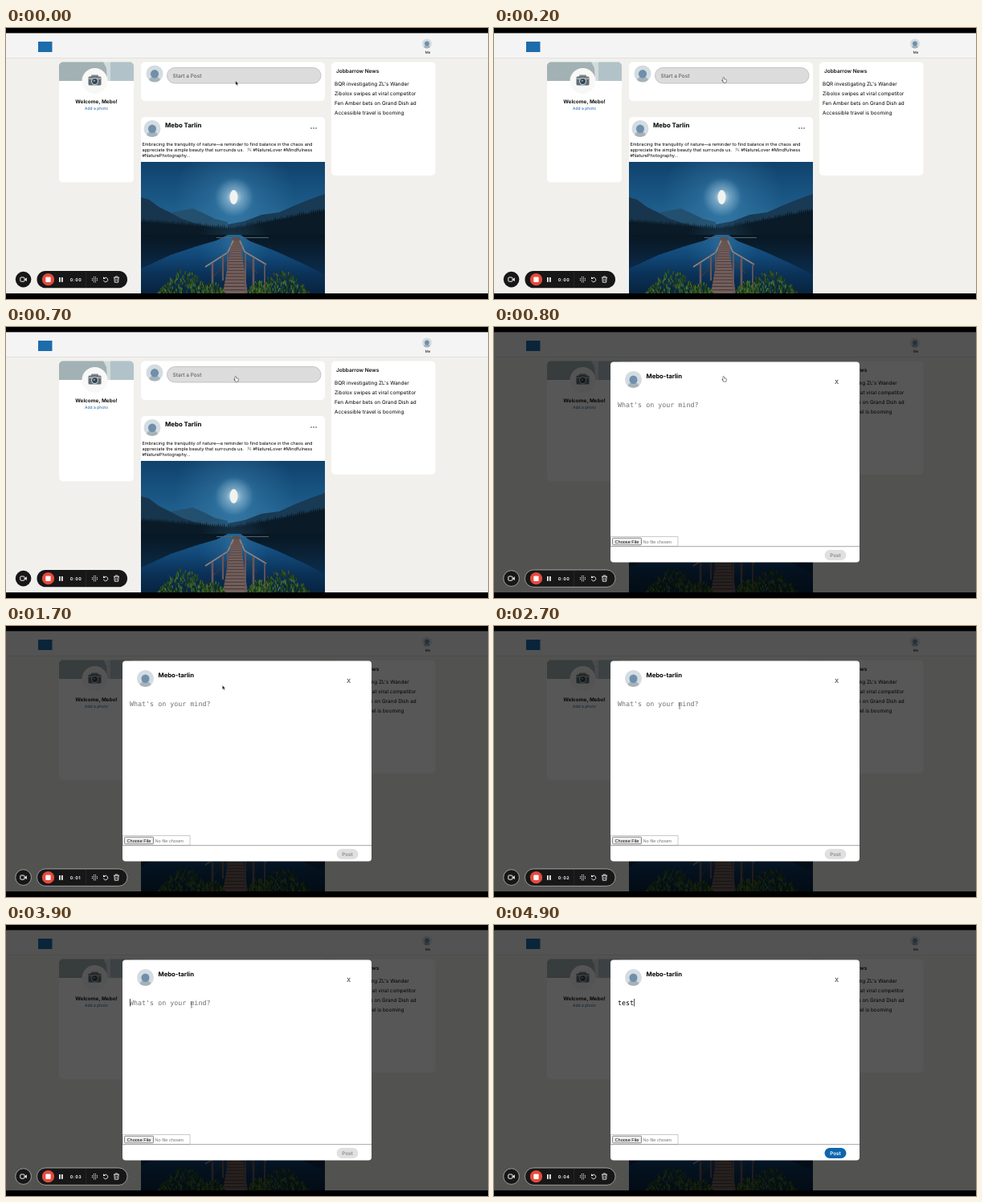
Write an HTML page with a canvas that moves like this. It is 600 px wide and 338 px high and loops after 5 s.

```html
<!DOCTYPE html>
<html lang="en">
<head>
<meta charset="utf-8">
<title>Start a post</title>
<style>
html, body { margin: 0; width: 100%; height: 100%; overflow: hidden; background: #000; }
canvas { display: block; width: 600px; height: 338px; }
</style>
</head>
<body>
<canvas id="stage"></canvas>
<script>
const W = 600, H = 338, LOOP = 5000;
const OPEN = 800, TYPE_START = 4100, KEY_GAP = 130;
const SANS = 'Inter, "Open Sans", sans-serif';
const ARIAL = '"Liberation Sans", Arial, sans-serif';
const MONO = '"DejaVu Sans Mono", monospace';
const USER = 'Mebo Tarlin';

const canvas = document.getElementById('stage');
const dpr = window.devicePixelRatio || 1;
canvas.width = W * dpr;
canvas.height = H * dpr;
const screen2d = canvas.getContext('2d');
let c = screen2d;

function rect(x, y, w, h, fill) {
  c.fillStyle = fill;
  c.fillRect(x, y, w, h);
}

function box(x, y, w, h, r, fill, stroke, lw = 1) {
  c.beginPath();
  c.roundRect(x, y, w, h, r);
  if (fill) { c.fillStyle = fill; c.fill(); }
  if (stroke) { c.strokeStyle = stroke; c.lineWidth = lw; c.stroke(); }
}

function oval(x, y, rx, fill, ry = rx) {
  c.beginPath();
  c.ellipse(x, y, rx, ry, 0, 0, Math.PI * 2);
  c.fillStyle = fill;
  c.fill();
}

function trace(points) {
  c.beginPath();
  points.forEach(([x, y], i) => i ? c.lineTo(x, y) : c.moveTo(x, y));
}

function poly(points, fill) {
  trace(points);
  c.closePath();
  c.fillStyle = fill;
  c.fill();
}

function line(points, color, width) {
  trace(points);
  c.strokeStyle = color;
  c.lineWidth = width;
  c.stroke();
}

function text(str, x, y, size, color = '#000', weight = 400, family = SANS, align = 'left') {
  c.font = `${weight} ${size}px ${family}`;
  c.textRendering = 'geometricPrecision';
  c.textAlign = align;
  c.fillStyle = color;
  c.fillText(str, x, y);
}

function gradient(y0, y1, ...colors) {
  const g = c.createLinearGradient(0, y0, 0, y1);
  colors.forEach((color, i) => g.addColorStop(i / (colors.length - 1), color));
  return g;
}

function glow(x, y, r, color, alpha) {
  const g = c.createRadialGradient(x, y, 0, x, y, r);
  g.addColorStop(0, `rgba(${color},${alpha})`);
  g.addColorStop(0.4, `rgba(${color},${alpha * 0.4})`);
  g.addColorStop(1, `rgba(${color},0)`);
  oval(x, y, r, g);
}

function seeded(seed) {
  return () => (seed = (seed * 16807) % 2147483647) / 2147483647;
}

function avatar(x, y, r) {
  c.save();
  oval(x, y, r, '#d3dce0');
  c.beginPath();
  c.arc(x, y, r, 0, 7);
  c.clip();
  oval(x, y + r * 0.82, r * 0.68, '#a6b2b9', r * 0.5);
  oval(x, y + r * 0.02, r * 0.48, '#6f8fac', r * 0.5);
  c.restore();
}

function trees(from, to, ridge, color, seed) {
  const rnd = seeded(seed);
  const points = [[from, 260]];
  for (let x = from; x <= to; x += 2.5) {
    const y = ridge(x);
    points.push([x, y + 2], [x + 1.2, y - 1 - rnd() * 3]);
  }
  poly([...points, [to + 2, 260]], color);
}

function bush(from, to, height, seed) {
  const rnd = seeded(seed);
  for (let i = 0; i < (to - from) * 4; i++) {
    const u = rnd();
    const x = from + u * (to - from);
    const y = 331 - height * Math.sin(Math.PI * u) * rnd();
    const green = `hsl(${85 + rnd() * 35},${30 + rnd() * 20}%,${10 + rnd() * 25}%)`;
    line([[x, y + 3], [x + rnd() * 4 - 2, y - 1]], green, 1.2);
  }
}

function dock() {
  poly([[281.5, 262], [291, 262], [301, 331], [270, 331]], '#74605d');
  for (let i = 0; i < 22; i++) {
    const u = (i / 22) ** 1.4;
    const y = 262 + 69 * u;
    line([[281.5 - 11.5 * u, y], [291 + 10 * u, y]], 'rgba(30,22,26,.6)', 0.5 + u * 0.6);
  }
  const wood = '#94817a', shade = '#43353a';
  line([[248, 298], [276, 280], [283, 265]], wood, 1.8);
  line([[257, 311], [277, 290]], shade, 1.4);
  line([[291, 265], [297, 279], [324, 295]], wood, 1.8);
  line([[298, 290], [313, 306]], shade, 1.4);
  const posts = [[257, 293, 331, 2.6], [270, 284, 315, 2.2], [276, 280, 302, 1.8],
    [280, 271, 285, 1.2], [293, 271, 286, 1.2], [298, 281, 331, 2], [308, 287, 331, 2.6], [322, 294, 331, 1.8]];
  for (const [x, top, bottom, width] of posts) line([[x, top], [x, bottom]], '#68565a', width);
}

function lake() {
  rect(168, 258, 229, 73, gradient(258, 331, '#1b5b8b', '#124a7a', '#0b3258', '#08233f'));
  glow(284, 272, 45, '70,140,185', 0.4);
  const shade = gradient(258, 305, '#081722', '#0a2136', '#0b2c4c');
  poly([[168, 258], [276, 258], [262, 265], [238, 272], [205, 283], [168, 300]], shade);
  poly([[292, 258], [397, 258], [397, 308], [370, 294], [335, 278], [304, 266]], shade);
  line([[262, 261.5], [327, 261.5]], '#56616c', 1);
}

function photo() {
  c.save();
  c.beginPath();
  c.rect(168, 167, 229, 164);
  c.clip();
  rect(168, 167, 229, 92, gradient(167, 259, '#10426d', '#1a5785', '#2b6c98'));
  glow(284, 211, 75, '85,160,205', 0.55);
  glow(284, 211, 24, '215,232,240', 0.95);
  oval(283.5, 211, 5, '#f0f3ef', 9);
  poly([[185, 240], [206, 230], [222, 227], [232, 225], [244, 230], [260, 238], [276, 242], [276, 260], [185, 260]], '#24506f');
  poly([[168, 211], [178, 214], [190, 223], [204, 230], [219, 238], [240, 245], [262, 250], [262, 260], [168, 260]], '#17364d');
  poly([[276, 245], [297, 241], [318, 233], [340, 230], [360, 221], [380, 213], [397, 207], [397, 260], [276, 260]], '#183a54');
  trees(168, 290, x => 240 + (x - 168) * 0.08, '#0a1b27', 7);
  trees(284, 397, x => 249 - (x - 284) * 0.2, '#0a1a26', 19);
  lake();
  bush(190, 254, 30, 31);
  bush(310, 378, 28, 57);
  dock();
  bush(244, 272, 15, 83);
  bush(300, 328, 16, 11);
  c.restore();
}

function cameraBadge() {
  oval(110.5, 66, 16, '#f8f8f7');
  box(106, 58.5, 9, 4, 1, '#7d898e');
  box(102.5, 60.5, 16, 11, 1.5, '#5f6c73');
  rect(102.5, 62.3, 16, 1.8, '#a5b0b4');
  rect(115, 61.2, 2.3, 1.4, '#bd7465');
  oval(110.5, 66.5, 4.5, '#cbd2d4');
  oval(110.5, 66.5, 3.4, '#33434e');
  oval(109.8, 65.7, 1.3, '#7897a7');
}

function profileCard() {
  c.save();
  box(66, 42.5, 93, 150, 5, '#fff');
  c.clip();
  rect(66, 42, 93, 24, '#d3dbdc');
  poly([[66, 42], [121, 42], [125, 50], [126, 66], [66, 66]], '#a2b2b4');
  rect(130, 42, 29, 24, '#b1c3c9');
  c.restore();
  cameraBadge();
  text('Welcome, Mebo!', 112.5, 94, 6.4, '#111', 700, SANS, 'center');
  text('Add a photo', 112.5, 102, 5, '#155fa6', 400, SANS, 'center');
}

function newsCard() {
  box(405, 42.5, 129.5, 141.5, 5, '#fff');
  text('Jobbarrow News', 411, 56, 6.5, '#111', 600);
  const items = ["BQR investigating ZL's Wander", 'Zibolox swipes at viral competitor',
    'Fen Amber bets on Grand Dish ad', 'Accessible travel is booming'];
  items.forEach((item, i) => text(item, 409, 71.6 + i * 12.05, 6.4));
}

function feed() {
  box(168, 42.5, 229, 48.5, 5, '#fff');
  avatar(185, 57, 10.5);
  box(200.5, 49.5, 191.5, 19.5, 9.75, '#dcdcdc', '#b9b9b9', 0.8);
  text('Start a Post', 207.5, 61.5, 6.5, '#626262', 500);

  box(168, 111, 229, 225, 5, '#fff');
  avatar(182, 125.5, 10.5);
  text(USER, 198, 124, 7.85, '#000', 700);
  for (const x of [380, 383, 386]) oval(x, 125, 0.75, '#222');
  text('Embracing the tranquility of nature—a reminder to find balance in the chaos and', 169.5, 147, 5.62);
  text('appreciate the simple beauty that surrounds us.', 169.5, 154, 5.62);
  line([[300.5, 154], [305, 149.5]], '#929a95', 0.8);
  oval(301.7, 150.8, 1.2, '#b0b9b3');
  oval(304.3, 152.8, 1.2, '#b0b9b3');
  text('#NatureLover #Mindfulness', 307.5, 154, 5.62);
  text('#NaturePhotography...', 169.5, 161, 5.62);
  photo();
}

function page() {
  rect(0, 0, W, H, '#f1f0ed');
  rect(0, 6, W, 31.5, '#f4f4f4');
  rect(0, 37, W, 1, '#e2e1df');
  rect(40, 17, 17.5, 13, '#1d6cab');
  avatar(524, 19.5, 6);
  text('Me', 525, 31.5, 4.4, '#222', 500, SANS, 'center');
  profileCard();
  feed();
  newsCard();
}

function modal(t) {
  const typed = 'test'.slice(0, Math.max(0, Math.floor((t - TYPE_START) / KEY_GAP) + 1));
  rect(0, 6, W, 325, 'rgba(0,0,0,.66)');
  box(145, 43.5, 310, 250, 4, '#fff');
  avatar(173.5, 65.5, 10.5);
  text(USER.replace(' T', '-t'), 189.5, 63.5, 7.7, '#000', 700);
  text('X', 426.5, 71, 7.2, '#555', 600, SANS, 'center');
  if (typed) text(typed, 154, 100, 8.36, '#000', 400, MONO);
  else text("What's on your mind?", 154, 100, 8.36, '#707070', 400, MONO);
  const caretOn = t >= 3800 || (t >= 2800 && t < 3300);
  if (caretOn) rect(154 + typed.length * 5.03, 92, 0.8, 9.5, '#222');

  box(145.5, 261.5, 83.5, 12, 0, null, '#bdbdbd', 0.8);
  box(147.5, 263.2, 36, 8.6, 1, '#f0f0f0', '#666', 0.8);
  text('Choose File', 150.5, 269.6, 5.6, '#000', 400, ARIAL);
  text('No file chosen', 185.5, 269.6, 5.6, '#777', 400, ARIAL);
  rect(145, 273.3, 310, 0.9, '#999');
  box(411.5, 278, 27, 13, 6.5, typed ? '#0d66ae' : '#e0e0e0');
  text('Post', 425, 286.8, 6.3, typed ? '#fff' : '#8a8a8a', 600, SANS, 'center');
}

function recorder(t) {
  const black = '#171717', white = '#f2f2f2';
  const rim = t >= OPEN ? 'rgba(255,255,255,.5)' : null;
  box(11.8, 303.8, 19.6, 19.6, 9.8, black, rim);
  box(38.5, 303, 112.5, 21.3, 10.65, black, rim);
  box(17.8, 311, 5.2, 5.2, 1, null, white, 1);
  poly([[23.3, 313.2], [25.8, 311.3], [25.8, 316], [23.3, 314.2]], white);

  oval(52.5, 313.7, 7.6, '#e64a3e');
  box(49.3, 310.5, 6.4, 6.4, 1, '#fff4f2');
  rect(66, 311, 1.8, 5.8, white);
  rect(69, 311, 1.8, 5.8, white);
  c.letterSpacing = '0.5px';
  text(`0:0${Math.floor(t / 1000)}`, 79.8, 315.6, 5.3, white, 700);
  c.letterSpacing = '0px';
  rect(99.5, 304, 0.6, 19.5, '#333');

  for (let i = 0; i < 4; i++) {
    for (let j = 0; j < 4; j++) {
      const corner = (i % 3 === 0) && (j % 3 === 0);
      if (!corner) oval(107.5 + i * 2, 310.7 + j * 2, 0.6, white);
    }
  }
  c.beginPath();
  c.arc(124, 314, 2.7, -2.2, 2.9);
  c.strokeStyle = white;
  c.lineWidth = 0.9;
  c.stroke();
  poly([[121, 310.2], [121, 313], [123.8, 313]], white);
  line([[134, 311.2], [141, 311.2]], white, 0.9);
  line([[136.2, 311], [136.2, 309.9], [138.8, 309.9], [138.8, 311]], white, 0.8);
  line([[134.9, 311.2], [135.3, 317.2], [139.7, 317.2], [140.1, 311.2]], white, 0.9);
  line([[136.8, 312.8], [136.8, 315.7]], white, 0.6);
  line([[138.3, 312.8], [138.3, 315.7]], white, 0.6);
}

function arrow(x, y) {
  const shape = [[0, 0], [0, 5], [1.1, 4.1], [1.9, 5.9], [2.8, 5.5], [2, 3.8], [3.5, 3.7]].map(([a, b]) => [x + a, y + b]);
  poly(shape, '#111');
  line([...shape, shape[0]], 'rgba(255,255,255,.7)', 0.4);
}

function hand(x, y) {
  box(x - 1.5, y - 3, 1.5, 4.5, 0.7, '#fff', '#333', 0.6);
  box(x - 1.6, y - 0.7, 4.4, 4.4, 1.3, '#fff', '#333', 0.6);
  rect(x - 1.2, y - 2, 0.9, 3, '#fff');
  line([[x - 1.6, y + 2], [x - 2.8, y + 0.4]], '#333', 0.8);
}

function beam(x, y) {
  line([[x, y - 3.3], [x, y + 3.3]], '#555', 0.8);
  line([[x - 1.2, y - 3.6], [x + 1.2, y - 3.6]], '#777', 0.6);
  line([[x - 1.2, y + 3.6], [x + 1.2, y + 3.6]], '#777', 0.6);
}

function pointer(t) {
  if (t < 100) return arrow(285.8, 66);
  if (t < 1000) return hand(286.5, 64.5);
  if (t >= 4700) return;
  const u = Math.min(1, Math.max(0, (t - 1300) / 1100));
  const ease = u * u * (3 - 2 * u);
  const x = 286 - 55 * ease, y = 63 + 36.5 * ease;
  if (y > 87) beam(x, y);
  else arrow(x, y);
}

const backdrop = document.createElement('canvas');
backdrop.width = canvas.width;
backdrop.height = canvas.height;
c = backdrop.getContext('2d');
c.scale(dpr, dpr);
page();
c = screen2d;
c.scale(dpr, dpr);

function draw(now) {
  const t = now % LOOP;
  c.drawImage(backdrop, 0, 0, W, H);
  if (t >= OPEN) modal(t);
  recorder(t);
  pointer(t);
  rect(0, 0, W, 6.4, '#000');
  rect(0, 331, W, 7, '#000');
}

function tick() {
  draw(performance.now());
  requestAnimationFrame(tick);
}
tick();
</script>
</body>
</html>
```
